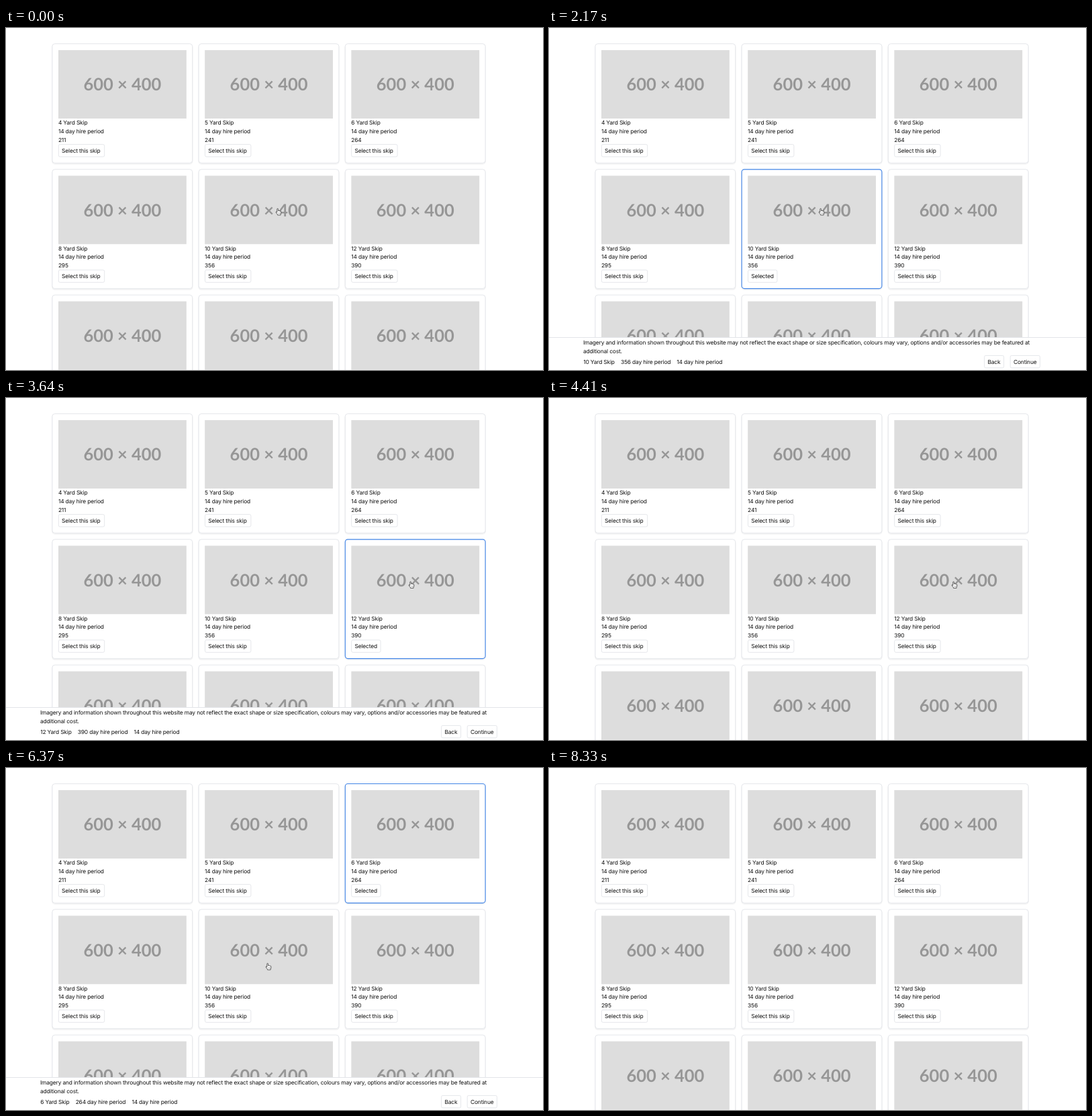
Animation of 800 by 510 pixels, one loop 8470 ms. Source, as an HTML page:

```html
<!DOCTYPE html>
<html lang="en">
<head>
<meta charset="utf-8">
<title>Skip selection</title>
<style>
  html, body { margin: 0; width: 100%; height: 100%; overflow: hidden; background: #fff; }
  svg { display: block; width: 100%; height: 100%; }
  text { font: 8.4px Inter, "Open Sans", sans-serif; letter-spacing: -.15px; fill: #111; text-rendering: geometricPrecision; }
  .size { font: 700 25.5px Lato, sans-serif; letter-spacing: 0; fill: #969696; text-anchor: middle; }
  .button { fill: #fff; stroke: #e5e7eb; stroke-width: 1; }
</style>
</head>
<body>
<svg id="stage" viewBox="0 0 800 510" preserveAspectRatio="none"></svg>
<script>
const LOOP = 8470;
const STEP = 70;
const COLUMN = 218.2, ROW = 187.3;

const skips = [
  [4, 211], [5, 241], [6, 264],
  [8, 295], [10, 356], [12, 390],
  [], [], []
].map(([yards, price]) => ({ yards, price }));

// Start, end and size in yards of each selection
const selections = [[1120, 2310, 10], [2800, 4410, 12], [5670, 7210, 6]];

// Pointer centre: time, x, y
const pointerPath = [
  [0, 406, 274], [2380, 406, 274], [2660, 603, 278], [3500, 603, 278],
  [3640, 604, 278.5], [4830, 604, 278.5], [5390, 603, 117], [6090, 603, 117],
  [6370, 391, 296], [6510, 385, 300], [7000, 554, 154], [7070, 555, 154.5],
  [7350, 555, 154.5], [7840, 440, -12], [LOOP, 440, -12]
];

function add(parent, tag, attributes = {}, content = "") {
  const node = document.createElementNS("http://www.w3.org/2000/svg", tag);
  for (const key in attributes) node.setAttribute(key, attributes[key]);
  node.textContent = content;
  parent.append(node);
  return node;
}

const box = (parent, x, y, width, height, rest) =>
  add(parent, "rect", { x, y, width, height, ...rest });
const label = (parent, x, y, content, rest) =>
  add(parent, "text", { x, y, ...rest }, content);

function button(parent, x, y, width, content) {
  const frame = box(parent, x, y, width, 18.4, { rx: 2.2, class: "button" });
  return { frame, caption: label(parent, x + 4.8, y + 12.4, content) };
}

function makeCard(skip, index) {
  const x = (index % 3) * COLUMN, y = Math.floor(index / 3) * ROW;
  const group = add(stage, "g", { transform: `translate(${x} ${y})` });
  const outline = { rx: 4, fill: "none" };
  box(group, 68.9, 24.8, 208.8, 177.9, { ...outline, stroke: "#f1f1f2", "stroke-width": 1.6 });
  skip.border = box(group, 68.9, 23.5, 208.8, 177.8, { ...outline, fill: "#fff" });
  box(group, 78, 33, 190.8, 102, { fill: "#ddd" });
  label(group, 173.4, 93.3, "600 × 400", { class: "size" });
  if (!skip.yards) return;
  label(group, 77.9, 144.3, `${skip.yards} Yard Skip`);
  label(group, 77.9, 157.1, "14 day hire period");
  label(group, 77.9, 169.8, skip.price);
  skip.button = button(group, 78.3, 173.6, 68.4, "Select this skip");
}

function makeFooter() {
  const group = add(stage, "g");
  box(group, 0, 461.5, 800, 49, { fill: "#fff" });
  box(group, 0, 461, 800, 1, { fill: "#e2e4e8" });
  label(group, 51, 472, "Imagery and information shown throughout this website may not reflect the exact shape or size specification, colours may vary, options and/or accessories may be featured at");
  label(group, 51, 484.7, "additional cost.");
  const summary = label(group, 51.2, 500.6, "");
  const parts = [0, 9.1, 9.1].map(dx => add(summary, "tspan", { dx }));
  button(group, 648.6, 488.4, 29, "Back");
  button(group, 687.2, 488.4, 44.2, "Continue");
  return { group, parts };
}

function makePointer() {
  const group = add(stage, "g");
  const hand = add(group, "g", { transform: "scale(.92)" });
  add(hand, "path", {
    d: "M-2.4 1.2V-4.2a.9 .9 0 0 1 1.8 0V-1.4q1-.8 1.7 .2q1-.6 1.6 .3q1.5-.3 1.5 1.2V2q0 1.2-.8 2.2V5.4H-1.6V4.5L-4 1.5q-.8-1.5 .4-1.4z",
    fill: "#fff", stroke: "#333", "stroke-width": .85, "stroke-linejoin": "round"
  });
  add(hand, "path", { d: "M-.1 1.4V3.6M1.3 1.4V3.6M2.6 1.4V3.6", stroke: "#666", "stroke-width": .5 });
  return group;
}

function pointerAt(time) {
  const next = Math.max(1, pointerPath.findIndex(point => point[0] > time));
  const [t0, x0, y0] = pointerPath[next - 1], [t1, x1, y1] = pointerPath[next];
  const p = (time - t0) / (t1 - t0);
  const eased = p * p * (3 - 2 * p);
  return [x0 + (x1 - x0) * eased, y0 + (y1 - y0) * eased];
}

function render(time) {
  const active = selections.find(([from, to]) => time >= from && time < to);
  const chosen = active && skips.find(skip => skip.yards === active[2]);

  for (const skip of skips) {
    const selected = skip === chosen;
    skip.border.setAttribute("stroke", selected ? "#4184e6" : "#e5e7eb");
    skip.border.setAttribute("stroke-width", selected ? 1.15 : 1);
    if (!skip.button) continue;
    skip.button.frame.setAttribute("width", selected ? 43.4 : 68.4);
    skip.button.caption.textContent = selected ? "Selected" : "Select this skip";
  }

  footer.group.style.display = chosen ? "" : "none";
  if (chosen) {
    const texts = [`${chosen.yards} Yard Skip`, `${chosen.price} day hire period`, "14 day hire period"];
    footer.parts.forEach((part, i) => part.textContent = texts[i]);
  }
  pointer.setAttribute("transform", `translate(${pointerAt(time)})`);
}

const stage = document.getElementById("stage");
skips.forEach(makeCard);
const footer = makeFooter();
const pointer = makePointer();
const start = performance.now();

function tick() {
  const time = (performance.now() - start) % LOOP;
  render(Math.floor(time / STEP) * STEP);
  requestAnimationFrame(tick);
}
tick();
</script>
</body>
</html>
```
